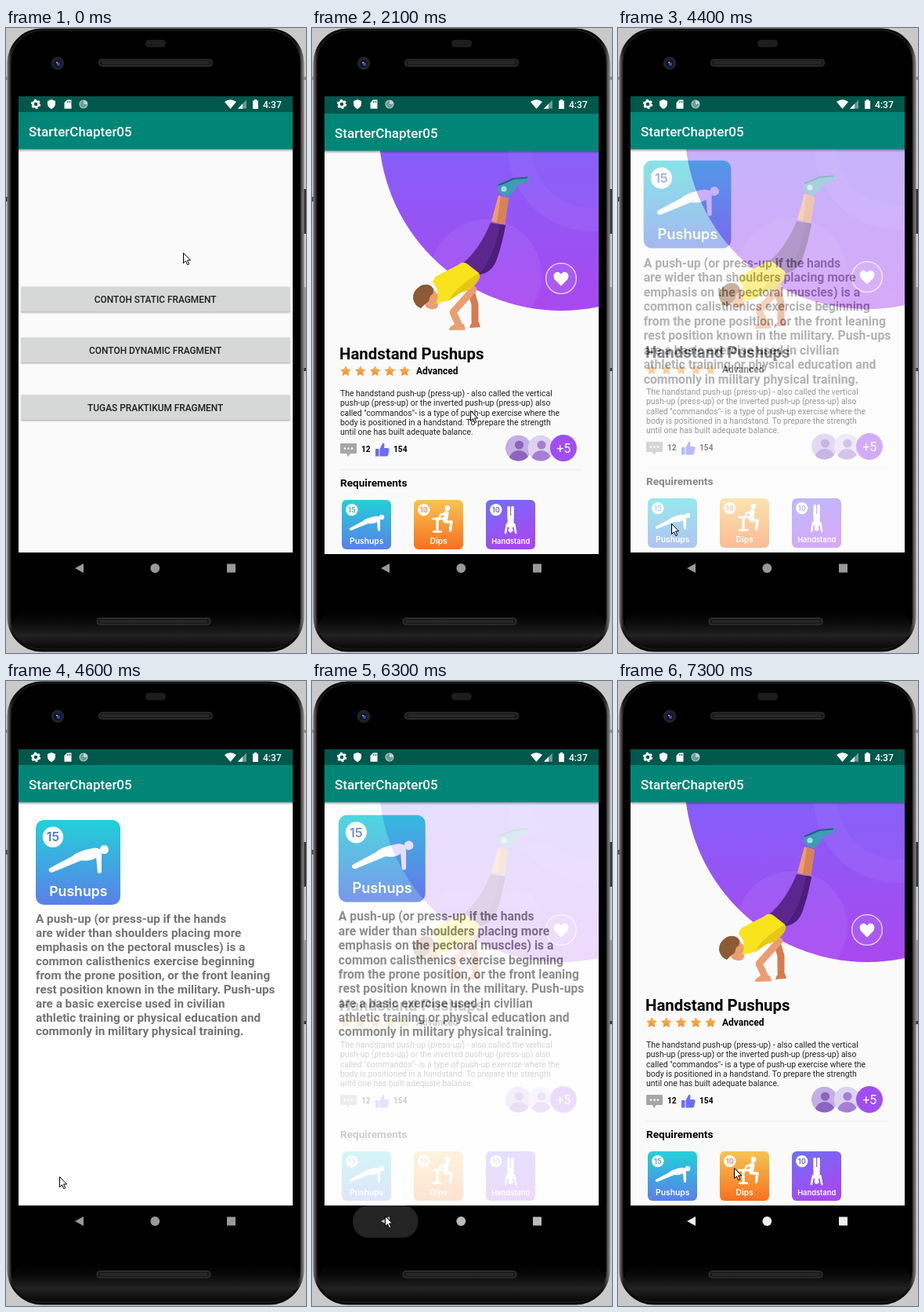
These frames come from a looping animation (383x796 px, 8 s). An HTML page:

```html
<!DOCTYPE html>
<html lang="id">
<head>
<meta charset="utf-8">
<title>StarterChapter05</title>
<style>
html, body { margin: 0; width: 100%; height: 100%; overflow: hidden; background: #c4c4c4; }
svg { display: block; }
text { font-family: Roboto, "Open Sans", sans-serif; }
.b { font-weight: 700; }
.m { font-weight: 500; }
.mid { text-anchor: middle; }
.card text { font-family: Inter, Roboto, sans-serif; font-weight: 600; text-anchor: middle; }
.pose { fill: none; stroke: #fff; stroke-linecap: round; stroke-linejoin: round; }
</style>
</head>
<body>
<svg id="stage" width="383" height="796" viewBox="0 0 383 796"></svg>
<script>
const STEP = 100, LOOP = 8000;

const gradient = (id, from, to, x2 = 0, y2 = 1) =>
  `<linearGradient id="${id}" x1="0" y1="0" x2="${x2}" y2="${y2}"><stop stop-color="${from}"/><stop offset="1" stop-color="${to}"/></linearGradient>`;
const label = (x, y, size, str, cls = '', fill = '#111') =>
  `<text x="${x}" y="${y}" font-size="${size}" class="${cls}" fill="${fill}">${str}</text>`;
const lines = (x, y, size, pitch, rows, cls, fill) =>
  rows.map((row, i) => label(x, y + i * pitch, size, row, cls, fill)).join('');
const path = (d, fill, extra = '') => `<path d="${d}" fill="${fill}" ${extra}/>`;
const disc = (x, y, r, fill, extra = '') => `<circle cx="${x}" cy="${y}" r="${r}" fill="${fill}" ${extra}/>`;
const box = (x, y, w, h, fill, extra = '') => `<rect x="${x}" y="${y}" width="${w}" height="${h}" fill="${fill}" ${extra}/>`;
const limb = (d, width) => `<path class="pose" d="${d}" stroke-width="${width}"/>`;

function star(x, y, r) {
  const pts = Array.from({ length: 10 }, (_, i) => {
    const a = i * Math.PI / 5 - Math.PI / 2, q = i % 2 ? r * 0.5 : r;
    return (x + q * Math.cos(a)).toFixed(1) + ',' + (y + q * Math.sin(a)).toFixed(1);
  });
  return `<polygon points="${pts.join(' ')}" fill="url(#gold)" stroke="#f29a38" stroke-width=".8" stroke-linejoin="round"/>`;
}

const poses = {
  Pushups: path('M10 38Q9 36.5 11 35.5L27 27Q31 23 43 20.8Q49 20.5 49 25V39Q47.3 40.5 46 39L45 28Q41 31 34 30L13 38.6Q11 39.5 10 38Z', '#fff') + disc(51, 22, 3.3, '#fff'),
  Dips: disc(43, 10.5, 3.4, '#fff') + limb('M41.5 17L40 26', 6) + limb('M40 17L34 19L32 25', 2.6) +
    limb('M40 28L48 28L46.5 39', 3.4) + limb('M24 24H38M25 40.5H35', 2.4) + limb('M30 24V40', 3.4),
  Handstand: limb('M29.2 9.5V23M34 9.5V23', 3.6) + limb('M31.6 24V32', 8) +
    limb('M27 31L25 42M36.2 31L38.2 42', 2.6) + disc(31.6, 38.5, 2.9, '#fff')
};

function card(name, count, paint, ink, x, y, size, scale = 1) {
  return `<g class="card" transform="translate(${x} ${y}) scale(${scale})">` +
    box(0, 0, 63, 63, `url(#${paint})`, 'rx="6"') + poses[name] +
    disc(12.8, 12.6, 7.7, '#fff') + label(12.8, 15.9, 9.2, count, '', ink) +
    label(31.7, 56.4, size, name, '', '#fff') + '</g>';
}

const defs = '<defs>' +
  gradient('violet', '#7f62fb', '#aa48ef') +
  gradient('gold', '#f9bd5b', '#ee8a2b') +
  gradient('sky', '#22d1d8', '#5a7fe9') +
  gradient('amber', '#f7c452', '#f8701f') +
  gradient('grape', '#6f70f8', '#a648ee', 0.4) +
  gradient('shade', '#000', '#fff') +
  '<linearGradient id="drop" x1="0" y1="0" x2="0" y2="1"><stop stop-opacity=".32"/><stop offset="1" stop-opacity="0"/></linearGradient>' +
  '<linearGradient id="frame" x1="0" x2="1" y1="0" y2="0"><stop stop-color="#7a7a7a"/><stop offset=".012" stop-color="#222"/><stop offset=".025" stop-color="#0a0a0a"/><stop offset=".97" stop-color="#0a0a0a"/><stop offset=".985" stop-color="#303030"/><stop offset="1" stop-color="#858585"/></linearGradient>' +
  '<linearGradient id="chin" x1="0" x2="0" y1="0" y2="1"><stop stop-color="#000" stop-opacity="0"/><stop offset=".7" stop-color="#222"/><stop offset="1" stop-color="#080808"/></linearGradient>' +
  '<clipPath id="body"><rect x="16" y="154" width="350" height="514"/></clipPath>' +
  '<clipPath id="window"><rect x="16" y="87" width="350" height="581"/></clipPath>' +
  '<clipPath id="orb"><circle cx="318" cy="125" r="233"/></clipPath>' +
  '<clipPath id="face"><circle r="16.6"/></clipPath></defs>';

const speaker = (x, y) => box(x, y, 145, 8.5, '#1b1b1b', 'rx="4" stroke="#3b3b3b"') +
  `<path d="M${x + 5} ${y + 4.2}h135" stroke="#333" stroke-width="4" stroke-dasharray="1 1"/>`;

const phone = box(0, 0, 383, 796, '#c9c9c9') + box(0, 62, 383, 4, '#8d8d8d') +
  box(379, 205, 4, 57, '#333') + box(380, 330, 3, 103, '#999') + box(379, 433, 4, 4, '#333') + box(0, 215, 5, 6, '#444') +
  box(1.5, 0.5, 379, 794, 'url(#frame)', 'rx="44"') +
  box(6, 3, 370, 788, '#000', 'rx="40" stroke="#262626"') +
  box(8, 735, 366, 55, 'url(#chin)', 'rx="38"') +
  box(178, 15, 26, 9.5, '#1d1d1d', 'rx="4.5"') +
  disc(66, 45, 8.3, '#20232a') + disc(66, 45.5, 4.6, '#0d1228') + disc(67, 46, 2.2, '#3b4d9c') + disc(65, 44, 1, '#aab4e0') +
  speaker(118.5, 40) + speaker(116, 751.5);

const bar = '<g id="bar">' + box(16, 87, 350, 20, '#00574b') + box(16, 107, 350, 47.5, '#008577') +
  box(16, 154.5, 350, 3.5, 'url(#drop)') + label(29, 137.6, 17, 'StarterChapter05', 'm', '#fff') + '</g>';

const status = '<g fill="#fff">' +
  '<circle cx="38" cy="97" r="3.6" fill="none" stroke="#fff" stroke-width="2.6"/>' +
  '<circle cx="38" cy="97" r="5.3" fill="none" stroke="#fff" stroke-width="1.8" stroke-dasharray="2.8 2.75"/>' +
  path('M58 91L63 93V97Q62.5 101 58 103.2Q53.5 101 53 97V93Z', '#fff') +
  path('M78 91.5H83.5V102.8H74.5V95Z', '#fff') +
  '<path d="M78.5 93v2.3M80.3 93v2.3M82 93v2.3" stroke="#00574b" stroke-width=".8"/>' +
  disc(99, 97, 5, '#6f9d95', 'stroke="#a9c6c1" stroke-width="1.2"') + path('M99 92A5 5 0 0 1 104 97L99 97Z', '#bdd2ce') +
  path('M279 94Q286.5 88.5 294 94L286.5 103Z', '#fff') +
  path('M307 91.5V102.7H296Z', '#fff', 'opacity=".4"') + path('M302 96.6V102.7H296Z', '#fff') +
  path('M315 92.5H317V91H320V92.5H322V103H315Z', '#fff') + label(328, 101.6, 12.1, '4:37', 'm', '#fff') + '</g>';

const button = (y, str) => box(19, y + 1.2, 344, 33, '#000', 'rx="2" opacity=".13"') +
  box(19, y + 1, 344, 32, '#000', 'rx="2" opacity=".12"') +
  box(19, y, 344, 32, '#d6d7d7', 'rx="2"') + label(190.7, y + 20.5, 11.9, str, 'm mid', '#1f1f1f');

const home = box(16, 87, 350, 581, '#fafafa') +
  button(329.3, 'CONTOH STATIC FRAGMENT') + button(394, 'CONTOH DYNAMIC FRAGMENT') + button(467, 'TUGAS PRAKTIKUM FRAGMENT') +
  box(19, 467, 344, 32, '#000', 'id="press" rx="2" opacity="0"');

const athlete =
  '<g fill="none" stroke-linecap="round" stroke-linejoin="round" stroke-width="9">' +
  '<path d="M203 333L208 350L208 371" stroke="#d47c50"/>' +
  '<path d="M206 331L180 360L187 375" stroke="#eb9d72"/></g>' +
  path('M175 383Q175 378 183 375H194L196 382.5Z', '#eb9d72') + path('M201 380Q202 374 207 372H213L215 379Z', '#d47c50') +
  path('M151 326L162 339L161 351Q160 357 152 356L146 354L141 342Z', '#eb9d72') +
  path('M129 343Q128 333 139 326Q150 322 155 330Q156 337 151 339L149 346L144 350L139 355Q131 352 129 343Z', '#8c5a35') +
  path('M229 244L238 211L251 215L246 249Z', '#eb9d72') + path('M241 212L251 215L246 249L236 246Z', '#d88257') +
  path('M228 246L247 249Q243 272 236 292Q230 310 213 312Q199 308 193 297Q214 280 228 246Z', '#5c268f') +
  path('M240 248L247 249Q243 272 236 292Q230 310 213 312Q233 290 240 248Z', '#4c1d7c') +
  path('M154 322L157 315L186 300Q193 294 199 299L213 310Q215 315 212 320Q204 332 190 335L175 345L158 349Q165 333 154 322Z', '#f8e31c') +
  path('M213 310Q215 315 212 320Q204 332 190 335L175 345Q182 329 213 310Z', '#e5c813') +
  path('M237 203Q236 197 245 196L257 190L275 188Q279 190 276 193L263 198Q257 208 250 213Q240 211 237 203Z', '#3d9db4') +
  '<path d="M238 198Q246 195 257 190L275 188.5" fill="none" stroke="#235f8b" stroke-width="2.2"/>' + disc(245, 203, 3.6, '#a9dbe0');

const avatar = (x, sky, skin) => `<g transform="translate(${x} 533)" clip-path="url(#face)">` +
  disc(0, 0, 16.6, sky) + disc(1, -4, 5.6, skin) + path('M-13 18Q-11 3 1 3Q13 4 14 18Z', skin) + '</g>';

const workout = '<g clip-path="url(#body)">' + box(16, 154, 350, 514, '#fafafa') +
  '<g clip-path="url(#orb)">' + box(85, 120, 281, 239, 'url(#violet)') +
  disc(357, 150, 107, '#fff', 'opacity=".05"') + disc(357, 150, 77, '#7a50f5', 'opacity=".22"') +
  disc(222, 313, 71, '#fff', 'opacity=".06"') + '</g>' + athlete +
  disc(318, 317, 19.4, '#fff', 'fill-opacity=".08" stroke="#e9d9fc" stroke-width="1.3"') +
  path('M318 326.5L310.5 319Q306.500 314 310.500 309.800Q315 307 318 311.500Q321 307 325.500 309.800Q329.500 314 325.500 319Z', '#fff') +
  label(35, 420.4, 20.4, 'Handstand Pushups', 'b', '#000') +
  [43, 61.8, 80.6, 99.4, 118.2].map(x => star(x, 435.3, 6.4)).join('') +
  label(133, 439.2, 12, 'Advanced', 'b', '#000') +
  lines(36, 467, 10.45, 12.35, [
    'The handstand push-up (press-up) - also called the vertical',
    'push-up (press-up) or the inverted push-up (press-up) also',
    'called "commandos"- is a type of push-up exercise where the',
    'body is positioned in a handstand. To prepare the strength',
    'until one has built adequate balance.'], '', '#222') +
  path('M37 527H56Q57 527 57 528V539Q57 540 56 540H49L46 544L44 540H37Q36 540 36 539V528Q36 527 37 527Z', '#a6a6a6') +
  [42, 46.5, 51].map(x => disc(x, 533.5, 1.3, '#fff')).join('') +
  label(63, 538, 10.2, '12', 'b', '#000') +
  path('M81 534H85.500V543.500H81ZM86.500 534L90.500 526.500Q93 527 92.500 530L92 533H97Q99 533.500 98.500 536L97 542Q96.500 543.500 95 543.500H86.500Z', '#6a6df6') +
  label(104, 538, 10.2, '154', 'b', '#000') +
  avatar(263.5, '#c4aee6', '#8c65bf') + avatar(292, '#ddd3f1', '#a57fd4') +
  disc(321, 533, 17, '#a04ef1') + label(321.3, 538.8, 16, '+5', 'mid', '#fff') +
  box(36, 560, 309, 1, '#eeeeee') + label(36, 582, 13.6, 'Requirements', 'b', '#000') +
  card('Pushups', '15', 'sky', '#4aa6dc', 38, 599, 10.3) +
  card('Dips', '10', 'amber', '#f08a4a', 130, 599, 10.3) +
  card('Handstand', '10', 'grape', '#6d62d8', 222, 599, 9.3) + '</g>';

const detail = '<g clip-path="url(#body)"><g id="detail">' + box(16, 154, 350, 514, '#fff') +
  card('Pushups', '15', 'sky', '#4a78d8', 38, 177, 10.3, 1.714) +
  lines(38, 308.2, 15.25, 17.9, [
    'A push-up (or press-up if the hands', 'are wider than shoulders placing more',
    'emphasis on the pectoral muscles) is a', 'common calisthenics exercise beginning',
    'from the prone position, or the front leaning', 'rest position known in the military. Push-ups',
    'are a basic exercise used in civilian', 'athletic training or physical education and',
    'commonly in military physical training.'], 'b', '#737373') + '</g></g>';

const nav = box(52, 668, 83.5, 41, '#242424', 'id="halo" rx="20" opacity="0"') +
  '<g id="nav">' + path('M88 688L99 682V694Z', 'inherit', 'style="fill:inherit"') +
  '<circle cx="190.300" cy="688" r="5.900"/><rect x="282" y="682.500" width="11" height="11"/></g>';

const pointer = path('M.5 .5V13.5L3.500 10.700L5.700 15.600L7.800 14.700L5.600 9.900H9.600Z', '#fff', 'id="pointer" stroke="#000" stroke-width="1"');

const stage = document.getElementById('stage');
stage.innerHTML = defs + phone + home + bar + nav +
  '<g id="win"><g clip-path="url(#window)">' + box(16, 87, 350, 581, '#fafafa') + workout + detail +
  '<use href="#bar"/></g></g>' + status + pointer;

const el = id => document.getElementById(id);
const set = (id, attrs) => Object.entries(attrs).forEach(([k, v]) => el(id).setAttribute(k, v));

// start, steps, x, y
const moves = [
  [800, 8, 202, 487], [2400, 1, 196, 493], [2700, 7, 68, 631], [5200, 1, 73, 626],
  [5400, 6, 93, 681], [6700, 5, 183, 638], [7300, 1, 147.5, 620]
];
// time, window opacity, window shift, detail opacity, detail scale
const screens = [
  [0, 0, 0, 0, 1], [2000, 0.9, 14, 0, 1], [2100, 1, 2, 0, 1], [2200, 1, 0, 0, 1],
  [4400, 1, 0, 0.53, 1.035], [4500, 1, 0, 0.92, 1.008], [4600, 1, 0, 1, 1],
  [6300, 1, 0, 0.8, 1.027], [6400, 1, 0, 0.45, 1.055], [6500, 1, 0, 0.1, 1.072], [6600, 1, 0, 0, 1]
];
const presses = [[0, 0], [1800, 0.02], [1900, 0.04], [2200, 0]];
const halos = [[0, 0], [6300, 1], [6500, 0.8], [6600, 0.5], [6700, 0.25], [6800, 0]];
const glows = [[0, 153], [6300, 187], [6400, 205], [6500, 225], [6600, 238]];

const at = (table, t) => table.filter(row => row[0] <= t).pop();
const ease = k => k * k * (3 - 2 * k);

function pointerAt(t) {
  let x = 226, y = 286;
  for (const [start, steps, tx, ty] of moves) {
    const n = Math.min(steps, Math.max(0, (t - start) / STEP + 1));
    const k = ease(n / steps);
    x += (tx - x) * k;
    y += (ty - y) * k;
  }
  return [Math.round(x), Math.round(y)];
}

function draw(now) {
  const t = Math.floor((now % LOOP) / STEP) * STEP;
  const [, show, shift, fade, zoom] = at(screens, t);
  set('win', { opacity: show, transform: `translate(0 ${shift})` });
  set('detail', { opacity: fade, transform: `translate(190.500 411) scale(${zoom}) translate(-190.500 -411)` });
  set('press', { opacity: at(presses, t)[1] });
  set('halo', { opacity: at(halos, t)[1] });
  const g = at(glows, t)[1];
  set('nav', { fill: `rgb(${g},${g},${g})` });
  set('pointer', { transform: `translate(${pointerAt(t).join(' ')})` });
}

const begin = performance.now();
function tick() {
  draw(performance.now() - begin);
  requestAnimationFrame(tick);
}
draw(0);
requestAnimationFrame(tick);
</script>
</body>
</html>
```
